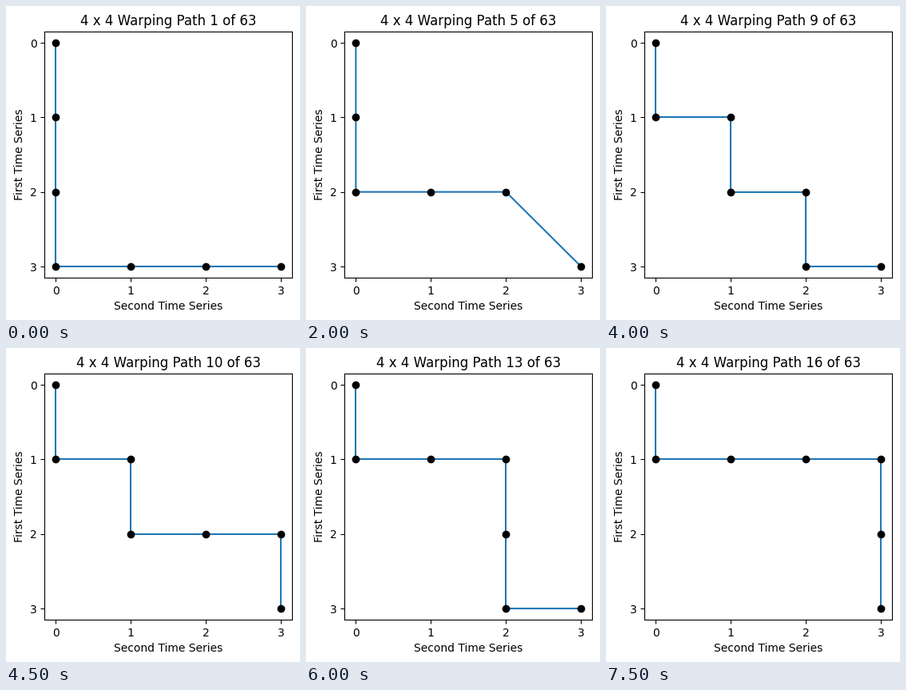
A matplotlib script that plays this animation: 368x393 px, repeating every 8 s.

```python
import matplotlib.pyplot as plt
from matplotlib.animation import FuncAnimation

W, H, DPI = 368, 393, 100
N = 4
SHOWN = 16
STEPS = [(1, 0), (0, 1), (1, 1)]  # down, right, diagonal


def warping_paths(path=((0, 0),)):
    """Yield every monotone path to the far corner, depth first."""
    row, col = path[-1]
    if row == col == N - 1:
        yield path
        return
    for dr, dc in STEPS:
        if row + dr < N and col + dc < N:
            yield from warping_paths(path + ((row + dr, col + dc),))


paths = list(warping_paths())

fig = plt.figure(figsize=(W / DPI, H / DPI), dpi=DPI)
ax = fig.add_axes([48.3 / W, 53 / H, 310 / W, 308 / H])
margin = 0.05 * (N - 1)
ax.set_xlim(-margin, N - 1 + margin)
ax.set_ylim(N - 1 + margin, -margin)
ax.set_xticks(range(N))
ax.set_yticks(range(N))
ax.set_xlabel("Second Time Series")
ax.set_ylabel("First Time Series")
title = ax.set_title("")
line, = ax.plot([], [], color="C0")
dots, = ax.plot([], [], "ko")


def draw(i):
    rows, cols = zip(*paths[i])
    line.set_data(cols, rows)
    dots.set_data(cols, rows)
    title.set_text(f"{N} x {N} Warping Path {i + 1} of {len(paths)}")
    return line, dots, title


anim = FuncAnimation(fig, draw, frames=SHOWN, interval=500,
                     repeat=True, repeat_delay=0)
plt.show()
```
